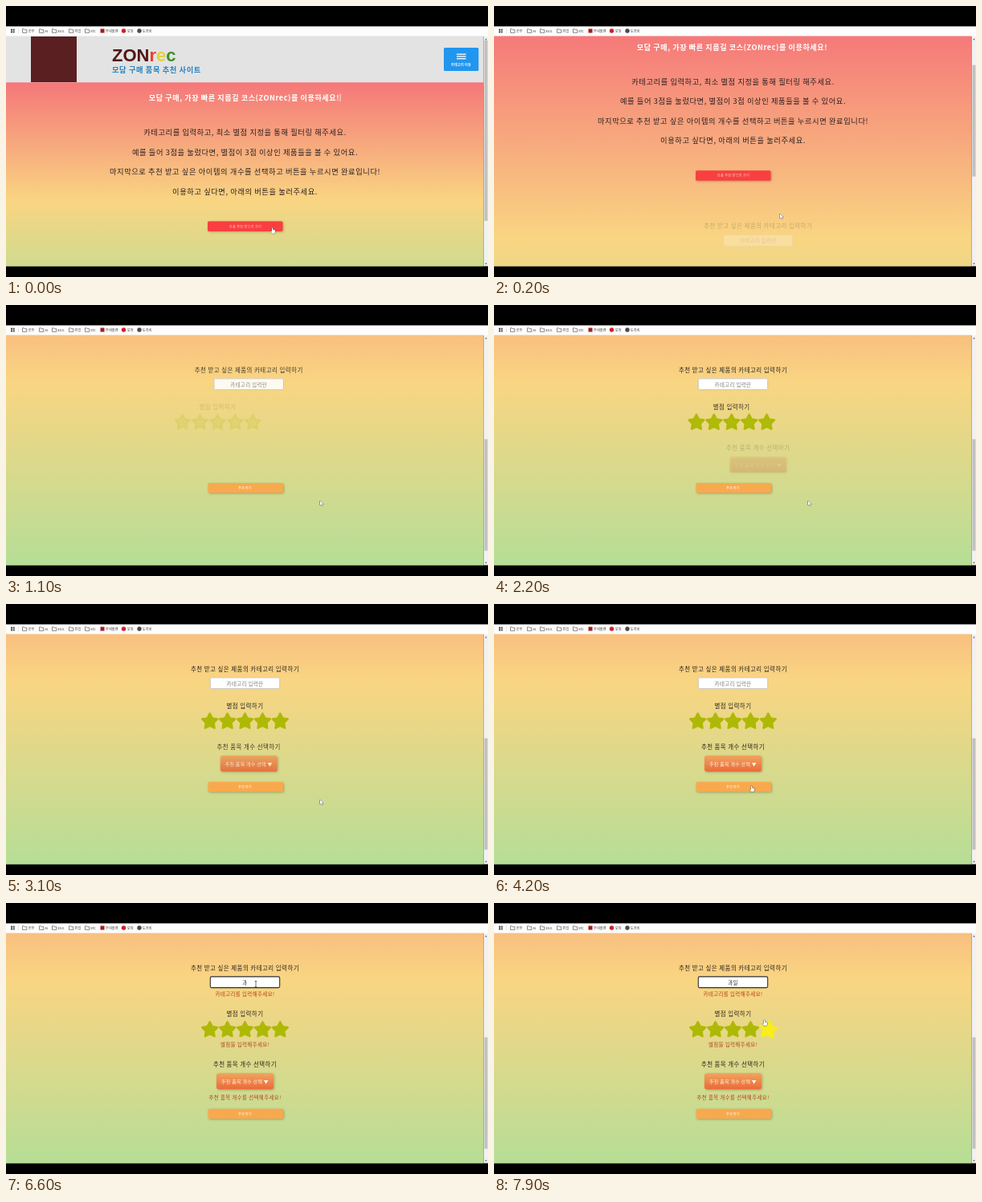
These frames come from a looping animation (600 by 338 pixels, 8 s). An HTML page with a canvas:

```html
<!DOCTYPE html>
<html lang="ko">
<head>
<meta charset="utf-8">
<title>구매 품목 추천</title>
<style>
html, body { margin: 0; width: 100%; height: 100%; overflow: hidden; background: #000; }
canvas { display: block; width: 600px; height: 338px; }
</style>
</head>
<body>
<canvas id="stage" width="600" height="338"></canvas>
<script>
const ctx = document.getElementById('stage').getContext('2d');
const LOOP = 8000, STEP = 100;
const SANS = '"Noto Sans CJK KR", "Noto Sans CJK", sans-serif';
const LATIN = '"Liberation Sans", sans-serif';
const VIEW = { top: 37.5, bottom: 324.7, right: 594.6 };
const MID = 297.5;
const ERRORS_AT = 4400, FOCUS_AT = 5900, HOVER_AT = 7900;

const clamp = v => Math.max(0, Math.min(1, v));

function rect(x, y, w, h, fill) {
  ctx.fillStyle = fill;
  ctx.fillRect(x, y, w, h);
}

function box(x, y, w, h, r, fill, shadow) {
  ctx.save();
  if (shadow) {
    ctx.shadowColor = 'rgba(0,0,0,.25)';
    ctx.shadowBlur = 3;
    ctx.shadowOffsetX = ctx.shadowOffsetY = 1;
  }
  ctx.fillStyle = fill;
  ctx.beginPath();
  ctx.roundRect(x, y, w, h, r);
  ctx.fill();
  ctx.restore();
}

function dot(x, y, r, fill) {
  ctx.fillStyle = fill;
  ctx.beginPath();
  ctx.arc(x, y, r, 0, 7);
  ctx.fill();
}

// y is the visual middle of the line; Hangul is set slightly open
function text(str, x, y, size, color, { align = 'center', weight = 400, family = SANS } = {}) {
  const open = family === SANS;
  ctx.font = `${weight} ${open ? size * 0.93 : size}px ${family}`;
  ctx.letterSpacing = open ? `${size * 0.056}px` : '0px';
  ctx.textAlign = align;
  ctx.fillStyle = color;
  ctx.fillText(str, x, y + size * 0.4);
  return ctx.measureText(str).width;
}

function vertical(y0, y1, ...colors) {
  const g = ctx.createLinearGradient(0, y0, 0, y1);
  colors.forEach((c, i) => g.addColorStop(i / (colors.length - 1), c));
  return g;
}

function star(x, y, color, scale = 1, turn = 0) {
  ctx.save();
  ctx.translate(x, y + 0.6);
  ctx.rotate(turn);
  ctx.scale(scale, scale);
  ctx.beginPath();
  for (let i = 0; i < 10; i++) {
    const a = i * Math.PI / 5 - Math.PI / 2, r = i % 2 ? 5.2 : 10;
    ctx.lineTo(r * Math.cos(a), r * Math.sin(a));
  }
  ctx.closePath();
  ctx.fillStyle = ctx.strokeStyle = color;
  ctx.lineWidth = 2.4;
  ctx.lineJoin = 'round';
  ctx.stroke();
  ctx.fill();
  ctx.restore();
}

function folder(x) {
  ctx.strokeStyle = '#555';
  ctx.lineWidth = 0.7;
  ctx.beginPath();
  ctx.moveTo(x, 28.8);
  ctx.lineTo(x + 2, 28.8);
  ctx.lineTo(x + 2.8, 29.7);
  ctx.lineTo(x + 5.3, 29.7);
  ctx.lineTo(x + 5.3, 33.3);
  ctx.lineTo(x, 33.3);
  ctx.closePath();
  ctx.stroke();
}

function bookmarks() {
  rect(0, 25.4, 600, 12.6, '#fdfdfd');
  for (let i = 0; i < 4; i++) rect(6 + (i % 2) * 2.7, 28.7 + (i >> 1) * 2.7, 2, 2, '#444');
  rect(15, 28, 0.5, 6, '#ccc');
  const label = (s, x) => text(s, x, 31, 4.3, '#333', { align: 'left' });
  [['공부', 20.5], ['AI', 41.5], ['ESG', 57.5], ['취업', 78.5], ['etc', 98.5]].forEach(([s, x]) => {
    folder(x);
    label(s, x + 7);
  });
  rect(117.5, 28.5, 5, 5, '#a3201d');
  label('무네플렌', 124);
  dot(146.5, 31, 2.7, '#c9242b');
  label('모담', 151);
  dot(166, 31, 2.7, '#4a4a4a');
  label('도라비', 170);
}

function header() {
  rect(0, 37, VIEW.right, 58.3, '#e3e3e3');
  rect(31, 38, 57, 57, '#5a1f20');
  let x = 132;
  [['ZON', '#521616'], ['r', '#e5432f'], ['e', '#e0d33c'], ['c', '#3f8f2c']].forEach(([s, c]) => {
    x += text(s, x, 60.3, 22, c, { align: 'left', weight: 700, family: LATIN });
  });
  text('모담 구매 품목 추천 사이트', 132, 79, 10, '#2782c0', { align: 'left', weight: 700 });
  box(545, 52, 43.3, 29, 1.5, '#2196ee');
  for (let i = 0; i < 3; i++) rect(561, 59.5 + i * 2.8, 11.5, 1.3, '#fff');
  text('카테고리 이동', 566.5, 73, 4.4, '#fff', { weight: 700 });
}

function intro(caret) {
  const w = text('모담 구매, 가장 빠른 지름길 코스(ZONrec)를 이용하세요!', 296.5, 113.9, 9.8, '#fff', { weight: 700 });
  if (caret) rect(296.5 + w / 2 + 0.6, 109.5, 0.8, 9.5, '#fff');
  [
    '카테고리를 입력하고, 최소 별점 지정을 통해 필터링 해주세요.',
    '예를 들어 3점을 눌렀다면, 별점이 3점 이상인 제품들을 볼 수 있어요.',
    '마지막으로 추천 받고 싶은 아이템의 개수를 선택하고 버튼을 누르시면 완료입니다!',
    '이용하고 싶다면, 아래의 버튼을 눌러주세요.'
  ].forEach((s, i) => text(s, MID, 157.3 + i * 24.4, 10, '#2b2320'));
  box(251, 268.5, 93.5, 12.5, 1.5, '#f93f3f', true);
  text('상품 추천 받으러 가기', 298, 274.8, 4.5, '#ffd9d6');
}

// Slides a block in from one side while it fades in
function reveal(t, start, side, draw) {
  const p = clamp((t - start) / 1360);
  if (!p) return;
  ctx.save();
  ctx.globalAlpha = p;
  ctx.translate(side * 40 * (1 - p), 0);
  draw();
  ctx.restore();
}

function typed(t) {
  const keys = [[6400, 'ㄱ'], [6500, '고'], [6600, '과'], [6900, '광'], [7000, '과이'], [7100, '과일']];
  return keys.reduce((s, [at, v]) => t >= at ? v : s, '');
}

function form(t) {
  const errors = t >= ERRORS_AT, gap = errors ? 11.6 : 0;
  const warn = (s, y) => errors && text(s, MID, y, 6.95, '#b4431f');

  reveal(t, -100, 1, () => {
    text('추천 받고 싶은 제품의 카테고리 입력하기', MID, 80.5, 8.05, '#2a241c');
    box(254, 91.5, 87, 14.5, 1.5, '#fff');
    ctx.strokeStyle = t >= FOCUS_AT ? '#2c2c2c' : '#b9b5ae';
    ctx.lineWidth = t >= FOCUS_AT ? 1.1 : 0.8;
    ctx.beginPath();
    ctx.roundRect(254.3, 91.9, 86.4, 13.7, 1.5);
    ctx.stroke();
    const value = typed(t);
    text(value || '카테고리 입력란', MID, 99, 6.9, value ? '#333' : '#7d7d7d');
    warn('카테고리를 입력해주세요!', 113.5);
  });

  reveal(t, 900, -1, () => {
    text('별점 입력하기', MID, 126.5 + gap, 8, '#2a241c');
    for (let i = 0; i < 5; i++) {
      const lit = i === 4 && t >= HOVER_AT;
      star(MID + (i - 2) * 21.9, 146 + gap, lit ? '#f9ee17' : '#aeb905', lit ? 1.08 : 1, lit ? 0.15 : 0);
    }
    warn('별점을 입력해주세요!', 176.5);
  });

  reveal(t, 1900, 1, () => {
    const y = 189 + gap * 2;
    text('추천 품목 개수 선택하기', MID, 178 + gap * 2, 8, '#2a241c');
    box(262, y, 71, 20, 3, vertical(y, y + 20, '#f0a55f', '#ec6a38'), true);
    text('추천 품목 개수 선택 ▼', MID, y + 10.3, 6.35, '#fff3e6');
    warn('추천 품목 개수를 선택해주세요!', 242.5);
  });

  box(251.5, 222 + gap * 3, 93.5, 12.3, 1.5, '#f8a94e', true);
  text('추천 받기', 297.5, 228.1 + gap * 3, 4.4, '#fff');
}

function scrollbar(top, height) {
  rect(VIEW.right, VIEW.top, 600 - VIEW.right, VIEW.bottom - VIEW.top, '#f1f1f1');
  rect(595.5, top, 4, height, '#c1c1c1');
  ctx.fillStyle = '#555';
  [[41.5, -1], [321.5, 1]].forEach(([y, d]) => {
    ctx.beginPath();
    ctx.moveTo(596.2, y - d * 0.8);
    ctx.lineTo(598.8, y - d * 0.8);
    ctx.lineTo(597.5, y + d);
    ctx.fill();
  });
}

const SHAPES = {
  arrow: [[0, 0], [0, 6], [1.4, 4.8], [2.4, 6.8], [3.2, 6.4], [2.3, 4.4], [4, 4.3]],
  hand: [[0, 0], [1, 0], [1.3, 2.4], [4, 3], [4, 5.6], [3.2, 7.3], [0, 7.3], [-1.6, 4.6], [-1, 4], [0, 4.8]]
};

function cursor(t) {
  const path = [
    [0, 331, 276.5], [200, 356, 259], [1000, 391, 244], [3500, 391, 244], [4100, 320, 227],
    [4700, 320, 227], [5400, 311, 101], [7600, 311, 101], [7900, 336, 146], [LOOP, 336, 146]
  ];
  const i = path.findIndex(k => k[0] > t);
  const [t0, x0, y0] = path[i - 1], [t1, x1, y1] = path[i];
  const p = (t - t0) / (t1 - t0);
  const x = x0 + (x1 - x0) * p, y = y0 + (y1 - y0) * p;
  const inField = x > 254 && x < 341 && y > 91 && y < 106;

  ctx.lineWidth = 0.7;
  ctx.strokeStyle = '#333';
  ctx.beginPath();
  if (inField) {
    ctx.moveTo(x - 1.3, y - 3.5);
    ctx.lineTo(x + 1.3, y - 3.5);
    ctx.moveTo(x, y - 3.5);
    ctx.lineTo(x, y + 3.5);
    ctx.moveTo(x - 1.3, y + 3.5);
    ctx.lineTo(x + 1.3, y + 3.5);
    ctx.stroke();
    return;
  }
  const overButton = t < 100 || (t >= 4100 && t < ERRORS_AT) || t >= HOVER_AT;
  SHAPES[overButton ? 'hand' : 'arrow'].forEach(([dx, dy]) => ctx.lineTo(x + dx, y + dy));
  ctx.closePath();
  ctx.fillStyle = '#fff';
  ctx.stroke();
  ctx.fill();
}

function draw(t) {
  const opened = t >= 100;
  const scroll = 257 * (0.5 - Math.cos(Math.PI * clamp(t / 605)) / 2);
  const page = opened ? 572 : 353;

  rect(0, 0, 600, 338, '#000');
  bookmarks();
  ctx.save();
  ctx.beginPath();
  ctx.rect(0, VIEW.top, 600, VIEW.bottom - VIEW.top);
  ctx.clip();
  ctx.save();
  ctx.translate(0, -scroll);
  rect(0, 95, VIEW.right, page - 57, vertical(95, 38 + page, '#f57779', '#f9d582', '#aedf99'));
  header();
  intro(!opened);
  if (opened) {
    ctx.translate(0, 257);
    form(t);
  }
  ctx.restore();
  scrollbar(43 + scroll * 277 / 572, opened ? 139 : 225);
  cursor(t);
  ctx.restore();
}

const begin = performance.now();
function tick() {
  const t = (performance.now() - begin) % LOOP;
  draw(Math.floor(t / STEP) * STEP);
  requestAnimationFrame(tick);
}
tick();
</script>
</body>
</html>
```
